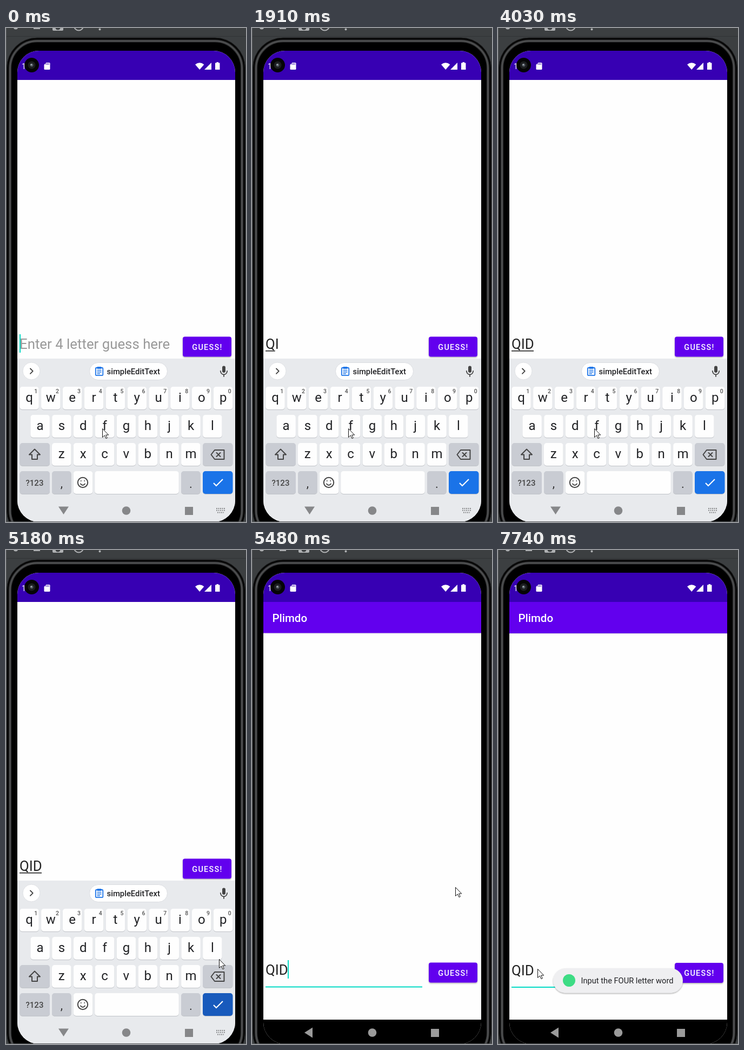
Animation, 444 px wide and 913 px high, one loop 8000 ms. Source, as an HTML page:

```html
<!DOCTYPE html>
<html lang="en">
<head>
<meta charset="utf-8">
<title>Word guess</title>
<style>
  html, body { margin: 0; width: 100%; height: 100%; overflow: hidden; background: #3c3f41; }
  svg { display: block; width: 100vw; height: 100vh; font-family: Roboto, sans-serif; }
  .medium { font-weight: 500; }
  .mid { text-anchor: middle; }
  .line { fill: none; stroke-linecap: round; stroke-linejoin: round; }
</style>
</head>
<body>
<svg viewBox="0 0 444 913">
  <defs>
    <clipPath id="screen"><rect x="21" y="42" width="403" height="871" rx="40"/></clipPath>
    <clipPath id="window"><rect x="21" y="96" width="403" height="817"/></clipPath>
    <filter id="shadow" x="-10%" y="-30%" width="120%" height="170%">
      <feDropShadow dx="0" dy="1.5" stdDeviation="1" flood-opacity=".32"/>
    </filter>
  </defs>

  <!-- emulator toolbar and phone body -->
  <rect width="444" height="913" fill="#3c3f41"/>
  <rect y="15" width="444" height="1" fill="#313335"/>
  <g fill="#afb1b3">
    <circle cx="18" cy="-2" r="4.5"/>
    <rect x="51" width="12" height="2"/>
    <rect x="86" y="-6" width="20" height="11" rx="2"/>
    <circle cx="96" cy="-1" r="4.5" fill="#3c3f41"/>
    <circle cx="134.5" cy="-4" r="8.5" fill="none" stroke="#afb1b3" stroke-width="2"/>
    <circle cx="173.5" cy="2.5" r="2"/>
  </g>
  <rect x="1.5" y="18" width="441" height="930" rx="56" fill="#060606" stroke="#202122"/>
  <rect x="7.5" y="24" width="429" height="918" rx="50" fill="#000" stroke="#343536" stroke-width="5"/>
  <rect x="7.5" y="24" width="429" height="918" rx="50" fill="none" stroke="#525354" stroke-width="2"/>

  <g clip-path="url(#screen)">
    <rect x="21" y="42" width="403" height="871" fill="#fefefe"/>
    <g clip-path="url(#window)">
      <g id="page">
        <rect x="21" y="154" width="403" height="1" fill="#dcdcdc"/>
        <rect x="21" y="96" width="403" height="58" fill="#6200ee"/>
        <text class="medium" x="37.4" y="133.3" font-size="20.5" fill="#fff">Plimdo</text>
        <text id="entry" x="25" y="785.5" font-size="25.8"></text>
        <rect id="composing" x="25" y="788.5" height="1.6" fill="#222"/>
        <rect x="25" y="807" width="290" height="2" fill="#03dac5"/>
        <rect id="caret" y="758.5" width="2" height="34" fill="#03dac5"/>
        <rect id="button" x="327" y="763" width="90" height="37" rx="4" filter="url(#shadow)"/>
        <text class="medium" x="344.3" y="787" font-size="14.4" letter-spacing="1.28" fill="#fff">GUESS!</text>
      </g>
    </g>

    <rect x="21" y="42" width="403" height="54" fill="#3700b3"/>
    <g fill="#fff">
      <text x="29" y="75.5" font-size="14">1</text>
      <path d="M74.500 64h5.500q1.500 0 1.500 1.500v10q0 1.500 -1.500 1.500h-8q-1.500 0 -1.500 -1.500v-7.500z"/>
      <path d="M350 67.5q8.200 -6.500 16.400 0l-8.200 9.500z"/>
      <path d="M380 64v13h-13z"/>
      <path d="M389.500 63h3.500v1.500h2.500v12.500h-8.500v-12.500h2.500z"/>
    </g>
    <path d="M74 65v3M76.500 65v3M79 65v3" stroke="#3700b3"/>
    <circle cx="47.5" cy="68.5" r="13.5" fill="#050505"/>
    <circle cx="47.5" cy="68.5" r="7" fill="#1c1e20"/>
    <circle cx="47.5" cy="68.5" r="3" fill="#51585f"/>
    <circle cx="46.8" cy="67.8" r="1.2" fill="#b6bec4"/>

    <g id="keyboard">
      <rect x="21" y="611" width="403" height="302" fill="#e8eaed"/>
      <circle cx="47" cy="634" r="16" fill="#fff" stroke="#dfe1e5"/>
      <path class="line" d="M45 629.5l4.700 4.700l-4.700 4.700" stroke="#444" stroke-width="1.9"/>
      <rect x="154.5" y="618.5" width="144" height="32" rx="16" fill="#fff" stroke="#dadce0"/>
      <g stroke="#1a73e8" fill="none" stroke-width="1.8">
        <rect x="165.8" y="628" width="13.5" height="14.2" rx="1.5"/>
        <path d="M168.500 632.500h8M168.500 635.700h8M168.500 639h5.500" stroke-width="1.5"/>
        <rect x="169.5" y="627" width="6" height="2"/>
      </g>
      <text class="medium" x="186.5" y="640" font-size="14.8" fill="#202124">simpleEditText</text>
      <rect x="400" y="624.5" width="6" height="12.5" rx="3" fill="#444"/>
      <path class="line" d="M396.800 634q.8 6.300 6.200 6.300t6.200 -6.300M403 640.500v3.500" stroke="#444" stroke-width="1.8"/>
      <g id="keys"></g>
      <path id="shift" class="line" d="M53 778.500l-10 10h5v8.500h10v-8.500h5z" stroke="#444" stroke-width="2"/>
      <path class="line" d="M386 780h17.500v17h-17.500l-6.500 -8.500zM389.500 785l7 7m0 -7l-7 7" stroke="#444" stroke-width="2"/>
      <g class="line" stroke="#444" stroke-width="2">
        <circle cx="142" cy="840" r="9.2"/>
        <path d="M138 842.500q4 5 8 0M138.800 837v.1M145.200 837v.1"/>
      </g>
      <path d="M384 841l5 5l12 -12" fill="none" stroke="#fff" stroke-width="2.2"/>
      <g fill="#868789">
        <path d="M97 884.500h19l-9.500 14.500z"/>
        <circle cx="222.5" cy="892" r="7.8"/>
        <rect x="331" y="885" width="15" height="15"/>
        <path d="M389 888h16M389 891.500h16M391 895.500h12" stroke="#868789" stroke-width="2" stroke-dasharray="2 1.5"/>
      </g>
    </g>

    <g id="nav" fill="#9b9b9b">
      <rect x="21" y="868" width="403" height="45" fill="#000"/>
      <path d="M97 892l15 -9.500v19z"/>
      <circle cx="222.5" cy="892" r="7.8"/>
      <rect x="331" y="885" width="15" height="15"/>
    </g>

    <g id="toast">
      <rect x="102" y="773" width="240" height="45.5" rx="22.7" fill="#efeff1" filter="url(#shadow)"/>
      <g id="message">
        <circle cx="131.5" cy="795.5" r="11.5" fill="#3ddc84"/>
        <text x="153.5" y="801" font-size="14.65" fill="#202124">Input the FOUR letter word</text>
      </g>
    </g>
  </g>
  <rect y="912" width="444" height="1" fill="#55585a"/>
  <rect width="1" height="913" fill="#55585a"/>
  <path id="pointer" d="M.5 .5v16l3.800 -3.500l2.700 5.700l2.300 -1l-2.600 -5.600h5z" fill="#fff" stroke="#111"/>
</svg>

<script>
const LOOP = 8000, PITCH = 39.85, PANNED = -192.5;
const $ = id => document.getElementById(id);
const set = (node, attrs) => {
  for (const name in attrs) node.setAttribute(name, attrs[name]);
  return node;
};
const add = (tag, attrs, text = '') => {
  const node = set(document.createElementNS('http://www.w3.org/2000/svg', tag), attrs);
  node.textContent = text;
  return $('keys').appendChild(node);
};

function addKey(x, y, width, fill) {
  add('rect', { x, y: y + 1, width, height: 42, rx: 5, fill: '#bfc2c7' });
  return add('rect', { x, y, width, height: 42, rx: 5, fill });
}
function addLabel(x, y, size, fill, text, weight = 400) {
  return add('text', { class: 'mid', x, y, 'font-size': size, fill, 'font-weight': weight }, text);
}

const GREY = '#c9ccd3', WHITE = '#fefefe', BLUE = '#1a73e8';
const letters = [];
[['qwertyuiop', 25.2], ['asdfghjkl', 45.3], ['zxcvbnm', 85]].forEach(([row, left], r) => {
  [...row].forEach((char, i) => {
    const x = left + i * PITCH, y = 663 + r * 52;
    addKey(x, y, 35.6, WHITE);
    letters.push([addLabel(x + 17.8, y + 28, 24, '#202124', char), char]);
    if (!r) addLabel(x + 30, y + 11.5, 10.5, '#555', (i + 1) % 10, 500);
  });
});
addKey(25.5, 767, 55.5, GREY);
addKey(364, 767, 55.5, GREY);
addKey(25.5, 819, 55.5, GREY);
addKey(85, 819, 35.6, GREY);
addKey(124.8, 819, 35.6, WHITE);
addKey(164.2, 819, 155.6, WHITE);
addKey(324, 819, 35.6, GREY);
const enterKey = addKey(364, 819, 55.5, BLUE);
addLabel(53, 846, 15, '#444', '?123', 500);
addLabel(103, 849, 22, '#333', ',');
addLabel(342, 849.5, 22, '#333', '.');

// Each row: start time in ms, then the values held until the next row.
const typing = [[0, '', 0], [850, 'Q', 0], [1910, 'QI', 1], [2030, 'QI', 2],
  [2300, 'QID', 2], [2590, 'QID', 3], [5330, 'QID', 0]];
const caps = [[0, false], [700, true], [1910, false], [2160, true], [2590, false]];
const caretFlips = [0, 400, 850, 1910, 2030, 3020, 3450, 4030, 4470, 5030,
  5330, 5770, 6200, 6730, 7150, 7590];
const panning = [[0, PANNED, 0], [5330, -60, 130], [5480, -.5, 302], [5630, 0, 302]];
const toasting = [[0, 0, 1, 0], [6320, 1, .964, .14], [6460, 1, 1, 1]];
const buttonFill = [[0, '#6200ee'], [6200, '#7019ef'], [6320, '#7c2ff0'],
  [6460, '#7422ef'], [6600, '#6200ee']];
const pointing = [[0, 178, 740], [4180, 206, 640], [4320, 282, 507], [4470, 372, 552],
  [4610, 417, 690], [4750, 413, 810], [4890, 408, 856], [5030, 394, 838],
  [5180, 394, 756], [5330, 386, 690], [5480, 376, 623], [5630, 373, 640],
  [5770, 369, 690], [5920, 365, 740], [6060, 362, 772], [6200, 362, 780],
  [6600, 340, 782], [6730, 270, 784], [6870, 190, 784], [7010, 124, 782],
  [7150, 92, 781], [7290, 81, 781], [7440, 78, 778], [7590, 75, 775], [7740, 73, 774]];
const widths = [0, 17.7, 24.7, 41];

const at = (steps, t) => steps.findLast(step => step[0] <= t).slice(1);

function draw(t) {
  const [text, underlined] = at(typing, t);
  $('entry').textContent = text || 'Enter 4 letter guess here';
  set($('entry'), { fill: text ? '#212121' : '#999' });
  set($('composing'), { width: widths[underlined] });
  const caretOn = caretFlips.filter(time => time <= t).length % 2;
  set($('caret'), { x: 25 + widths[text.length], opacity: caretOn });

  const [upper] = at(caps, t);
  for (const [node, char] of letters) node.textContent = upper ? char.toUpperCase() : char;
  set($('shift'), { style: `fill: ${upper ? '#444' : 'none'}` });
  set(enterKey, { fill: t >= 5180 ? '#185abc' : BLUE });

  const [pan, slide] = at(panning, t);
  set($('page'), { transform: `translate(0 ${pan})` });
  set($('keyboard'), { transform: `translate(0 ${slide})` });
  set($('nav'), { opacity: slide ? 1 : 0 });
  set($('button'), { fill: at(buttonFill, t)[0] });

  const [shown, scale, ink] = at(toasting, t);
  set($('toast'), {
    opacity: shown,
    transform: `translate(222 795.5) scale(${scale}) translate(-222 -795.5)`
  });
  set($('message'), { opacity: ink });
  set($('pointer'), { transform: `translate(${at(pointing, t).join(' ')})` });
}

const start = performance.now();
function tick() {
  draw((performance.now() - start) % LOOP);
  requestAnimationFrame(tick);
}
tick();
</script>
</body>
</html>
```
